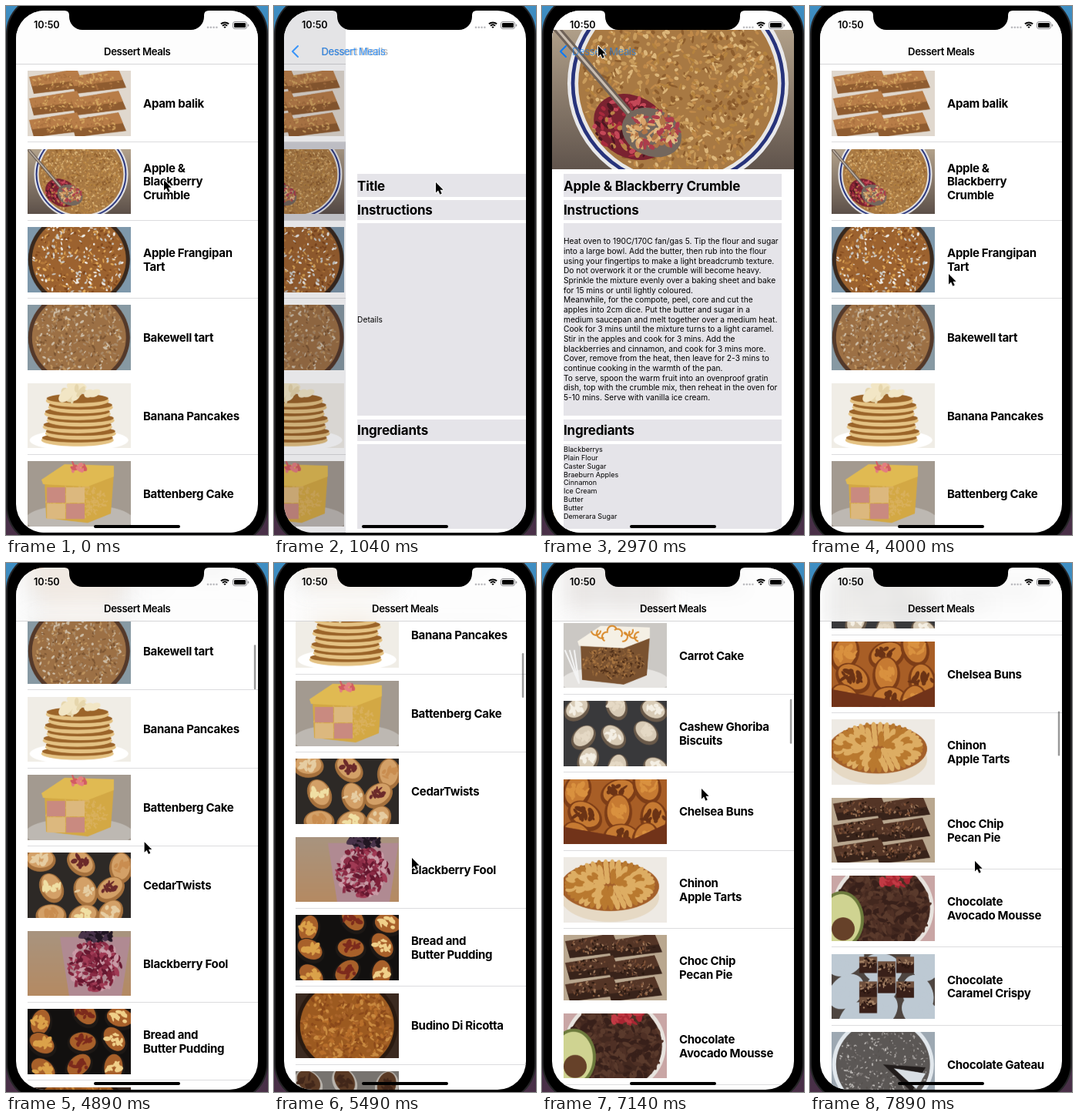
Animation, 340 px wide and 687 px high, one loop 8 s. Source, as an HTML page with a canvas:

```html
<!DOCTYPE html>
<html lang="en">
<head>
<meta charset="utf-8">
<title>Dessert Meals</title>
<style>
html, body { margin: 0; width: 100%; height: 100%; overflow: hidden; background: #000; }
canvas { display: block; }
</style>
</head>
<body>
<canvas id="stage" width="340" height="687"></canvas>
<script>
const stage = document.getElementById('stage').getContext('2d');
let g = stage;
const LOOP = 8000, TICK = 148.5, ROW = 101.4, TOP = 75.7;
const W = 133.5, H = 84.5, CX = W / 2, CY = H / 2, ZOOM = 314 / W;
const BLUE = '#007aff', PANEL = '#e5e4e9';

let seed = 1;
const random = () => (seed = seed * 16807 % 2147483647) / 2147483647;
const clamp = v => Math.max(0, Math.min(1, v));
const easeOut = u => 1 - (1 - clamp(u)) ** 3;
const smooth = u => u * u * (3 - 2 * u);
const mix = (a, b, u) => a + (b - a) * u;

// Drawing helpers
function box(color, x, y, w, h) { g.fillStyle = color; g.fillRect(x, y, w, h); }
function round(color, x, y, w, h, r) {
  g.fillStyle = color; g.beginPath(); g.roundRect(x, y, w, h, r); g.fill();
}
function oval(color, x, y, rx, ry = rx, turn = 0) {
  g.fillStyle = color; g.beginPath(); g.ellipse(x, y, rx, ry, turn, 0, 7); g.fill();
}
function trace(points) {
  g.beginPath();
  for (let i = 0; i < points.length; i += 2) g.lineTo(points[i], points[i + 1]);
}
function poly(color, ...points) { trace(points); g.fillStyle = color; g.fill(); }
function line(color, width, ...points) {
  trace(points); g.strokeStyle = color; g.lineWidth = width; g.lineCap = g.lineJoin = 'round'; g.stroke();
}
function arc(color, width, x, y, r, from, to) {
  g.beginPath(); g.arc(x, y, r, from, to);
  g.strokeStyle = color; g.lineWidth = width; g.lineCap = 'butt'; g.stroke();
}
function specks(colors, count, x, y, rx, ry, size) {
  for (let i = 0; i < count; i++) {
    const a = random() * 6.283, d = Math.sqrt(random());
    oval(colors[i % colors.length], x + rx * d * Math.cos(a), y + ry * d * Math.sin(a),
      size * (.5 + random()), size * (.3 + random() * .5), random() * 3);
  }
}
function text(string, x, y, weight, size, color = '#000', spacing = 0) {
  g.font = `${weight} ${size}px Inter, sans-serif`;
  g.letterSpacing = spacing + 'px';
  g.fillStyle = color;
  g.fillText(string, x, y);
}

// Kinds of dish, each drawn from a few colours
function backdrop(top, bottom = top) {
  const fade = g.createLinearGradient(0, 0, 0, H);
  fade.addColorStop(0, top); fade.addColorStop(1, bottom);
  box(fade, 0, -5, W, H + 10);
}
function pie(back, rim, base, crumbs, size = 2) {
  backdrop(back);
  oval(rim, CX, CY, 66, 62);
  oval(base, CX, CY, 61, 57);
  specks(crumbs, 420, CX, CY, 59, 54, size);
}
function crumble() {
  backdrop('#b3a28b', '#5c5049');
  for (const [i, color] of ['#e9e9eb', '#27337b', '#e8e7e6', '#a87943'].entries()) {
    oval(color, 69.5, 33, 61 - i * 2, 59 - i * 2);
  }
  specks(['#c99c5c', '#8d5d2d', '#dcb67a', '#b5833f', '#c08a4a'], 1100, 69.5, 33, 53, 51, 1.4);
  oval('#7a2230', 44, 57, 22, 17, .5);
  specks(['#a82a3d', '#4c1720', '#c44858', '#b98347'], 120, 44, 57, 21, 16, 1.8);
  line('#6f6258', 4, 2, 2, 44, 51);
  line('#c9bdb0', 1.4, 2, 2, 44, 51);
  oval('#74675d', 55, 60, 17, 13, .4);
  specks(['#d9a36a', '#ad3d4b', '#e0bd85', '#b27646'], 130, 56, 59, 14, 10, 1.8);
}
function stack(back, plate, side, top, topping) {
  backdrop(back);
  oval(plate, CX, 74, 64, 14);
  for (let i = 0; i < 7; i++) {
    const x = CX + (i % 2) * 4 - 2, y = 74 - i * 8.5;
    oval(side, x, y, 47 - i, 8);
    oval(top, x, y - 3, 46 - i, 6);
  }
  specks(topping, 12, CX, 12, 28, 8, 9);
}
function block(back, plate, top, front, crumbs) {
  backdrop(back);
  oval(plate, CX, 76, 70, 20);
  poly(front, 22, 24, 78, 30, 112, 16, 108, 68, 78, 80, 24, 74);
  specks(crumbs, 260, 64, 52, 40, 21, 1.8);
  poly(top, 18, 24, 48, 4, 112, 6, 112, 20, 78, 33, 20, 30);
}
function heap(back, shade, face, fillings, size = 20) {
  backdrop(back);
  for (let i = 0; i < 9; i++) {
    const x = (i % 3 + .35) * 45 + random() * 16, y = (i / 3 | 0) * 34 + 4 + random() * 14, turn = random() * 3;
    oval(shade, x, y + 2, size, size * .75, turn);
    oval(face, x, y, size * .85, size * .6, turn);
    specks([fillings[i % fillings.length]], 12, x, y, size * .55, size * .35, size * .2);
  }
}
function slices(back, shade, face, crumbs) {
  backdrop(back);
  for (let i = 0; i < 6; i++) {
    const x = 30 + i % 2 * 54, y = 4 + (i / 2 | 0) * 28;
    poly(shade, x - 28, y + 4, x + 34, y - 6, x + 44, y + 18, x - 22, y + 26);
    poly(face, x - 28, y + 4, x + 34, y - 6, x + 40, y + 8, x - 24, y + 16);
    specks(crumbs, 60, x + 6, y + 10, 28, 10, 1.8);
  }
}
function glass(back, table, cream, colors) {
  backdrop(back, table);
  poly(cream, 42, 8, W, 8, 122, H, 54, H);
  specks(colors, 260, 87, 46, 34, 32, 4);
  specks(['#211622', '#49334a'], 70, 90, 6, 20, 8, 4);
}

const meals = [
  [['Apam balik'], () => slices('#e0d8ce', '#8f5c30', '#b87d48', ['#d3a45f', '#a9713f'])],
  [['Apple &', 'Blackberry', 'Crumble'], crumble],
  [['Apple Frangipan', 'Tart'], () => pie('#7e98ab', '#39291e', '#9c622f', ['#dfa858', '#81481e', '#f0eee9', '#b5793a', '#c9c8c3'])],
  [['Bakewell tart'], () => pie('#8799a3', '#54392a', '#9c7045', ['#cdbda6', '#a98a69', '#7d5633', '#bd935f'])],
  [['Banana Pancakes'], () => stack('#f0ede6', '#fff', '#e4c283', '#9b6429', ['#f2e6c5', '#e6d6ac'])],
  [['Battenberg Cake'], () => {
    block('#a39a90', '#bdb8b2', '#e0ba52', '#d3a844', ['#d9b05c']);
    for (let i = 0; i < 4; i++) box(i % 3 ? '#dcb87e' : '#c98a80', 25 + i % 2 * 25, 34 + (i >> 1) * 21, 24, 20);
    specks(['#d25c62', '#e47d80'], 12, CX, 8, 12, 5, 4);
  }],
  [['CedarTwists'], () => heap('#2d2926', '#a5703c', '#d3a067', ['#e6cda2', '#6b2a2a', '#c98d50', '#f0dfa4'])],
  [['Blackberry Fool'], () => glass('#a8947f', '#b58a62', '#b08a92', ['#7c2038', '#65172f', '#a03a54', '#8a2b45', '#c99aa6'])],
  [['Bread and', 'Butter Pudding'], () => heap('#12100f', '#1d1815', '#a8602a', ['#dba24a', '#7c2a1c', '#f0d08a'])],
  [['Budino Di Ricotta'], () => pie('#3b2a20', '#2a1a10', '#9c5a20', ['#b86f2b', '#8b491a', '#a9642a', '#c98a40'], 3)],
  [['Canadian', 'Butter Tarts'], () => heap('#77736f', '#b9b4ad', '#5a3a25', ['#42271a'])],
  [['Carrot Cake'], () => {
    block('#cbc8c4', '#e6e4e1', '#f5f0e5', '#7a5230', ['#a87541', '#513019', '#8f6237']);
    for (let i = 0; i < 9; i++) arc('#d98a2b', 2, 42 + i * 7, 10 + i % 3 * 4, 6, i, i + 3);
    for (let i = 0; i < 3; i++) line('#f4f4f4', 2, 2 + i * 6, 36, 20, 78);
  }],
  [['Cashew Ghoriba', 'Biscuits'], () => heap('#39393b', '#6a5a4a', '#d8cbb6', ['#f4efe4', '#e5d9c5'], 18)],
  [['Chelsea Buns'], () => {
    heap('#a85e26', '#7d3d17', '#c67a32', ['#d9913f', '#6b3315'], 24);
    poly('#713319', 0, 62, 90, 78, W, 58, W, H, 0, H);
  }],
  [['Chinon', 'Apple Tarts'], () => {
    backdrop('#eeeae4');
    oval('#e6d9c4', 60, 52, 64, 32);
    oval('#a4602a', 60, 38, 64, 32);
    for (let r = 52; r > 4; r -= 12) for (let a = 0; a < 6.28; a += 8 / r) {
      oval(random() < .4 ? '#b9792f' : '#ddad63', 60 + r * Math.cos(a), 36 + r * .5 * Math.sin(a), 7, 3.5, a);
    }
  }],
  [['Choc Chip', 'Pecan Pie'], () => slices('#b9a78f', '#38231a', '#543526', ['#805338', '#29180f', '#a07a5c', '#614031'])],
  [['Chocolate', 'Avocado Mousse'], () => {
    pie('#c9a6a5', '#e8e4df', '#43281f', ['#4f3025', '#38201a', '#5a3a2c'], 5);
    specks(['#a92632', '#c23a44'], 30, 84, 4, 24, 8, 5);
    oval('#6c7a3c', 13, 57, 29, 37); oval('#cfd391', 13, 57, 25, 33); oval('#664129', 15, 69, 15);
  }],
  [['Chocolate', 'Caramel Crispy'], () => {
    heap('#4e4540', '#bdc9d3', '#bdc9d3', ['#bdc9d3'], 26);
    for (let i = 0; i < 7; i++) {
      const x = 36 + i % 3 * 24, y = 4 + (i / 3 | 0) * 26 + i % 2 * 6;
      box('#392019', x, y, 23, 21);
      box('#70503d', x, y, 23, 8);
      specks(['#a78467', '#29150f'], 22, x + 11, y + 8, 10, 7, 1.8);
    }
  }],
  [['Chocolate Gateau'], () => {
    pie('#9da8b2', '#e2e8ed', '#5b5755', ['#a8a4a1', '#55504d', '#c4c1be', '#7b7674'], 1.4);
    poly('#211c1b', CX, CY, 122, 46, 104, 78);
    poly('#d9dfe4', CX + 14, CY + 5, 122, 54, 110, 74);
  }],
];

const photos = meals.map(([, paint], i) => {
  const canvas = document.createElement('canvas');
  canvas.width = 314;
  canvas.height = Math.round(H * ZOOM);
  g = canvas.getContext('2d');
  g.scale(ZOOM, ZOOM);
  seed = 77 + i * 991;
  paint();
  return canvas;
});
g = stage;
g.imageSmoothingQuality = 'high';

const instructions = `Heat oven to 190C/170C fan/gas 5. Tip the flour and sugar
into a large bowl. Add the butter, then rub into the flour
using your fingertips to make a light breadcrumb texture.
Do not overwork it or the crumble will become heavy.
Sprinkle the mixture evenly over a baking sheet and bake
for 15 mins or until lightly coloured.
Meanwhile, for the compote, peel, core and cut the
apples into 2cm dice. Put the butter and sugar in a
medium saucepan and melt together over a medium heat.
Cook for 3 mins until the mixture turns to a light caramel.
Stir in the apples and cook for 3 mins. Add the
blackberries and cinnamon, and cook for 3 mins more.
Cover, remove from the heat, then leave for 2-3 mins to
continue cooking in the warmth of the pan.
To serve, spoon the warm fruit into an ovenproof gratin
dish, top with the crumble mix, then reheat in the oven for
5-10 mins. Serve with vanilla ice cream.`.split('\n');
const ingredients = ['Blackberrys', 'Plain Flour', 'Caster Sugar', 'Braeburn Apples', 'Cinnamon',
  'Ice Cream', 'Butter', 'Butter', 'Demerara Sugar'];

// Each move: start time, end time, then the values reached
function follow(t, values, moves, ease) {
  for (const [start, end, ...goal] of moves) {
    const u = ease(clamp((t - start) / (end - start)));
    values = values.map((v, i) => mix(v, goal[i], u));
  }
  return values;
}
const pointerMoves = [[0, 594, 210, 229], [2150, 2950, 73, 52], [3250, 4000, 180, 348],
  [4440, 5490, 179, 383], [5940, 7128, 207, 293], [7128, 7870, 214, 387]];
const scrollMoves = [[4440, 5790, 442.8], [5940, 7128, 1121.8], [7128, 7870, 1300.4]];

function drawRows(scroll, highlight) {
  meals.forEach(([lines], i) => {
    const y = TOP + i * ROW - scroll;
    if (y < -ROW || y > 687) return;
    if (i == 1 && highlight > 0) box(`rgba(209,209,214,${highlight})`, 13, y, 314, ROW);
    g.drawImage(photos[i], 28, y + 8.5, W, H);
    lines.forEach((s, n) =>
      text(s, 178, y + 56.3 + (n - (lines.length - 1) / 2) * 17.8, 700, 15, '#000', -.3));
    // Hairlines vanish at some subpixel positions
    const part = y - Math.floor(y);
    if (i && (part < .2 || part > .4)) box('#dcdcde', 28, Math.floor(y - .2), 299, 1);
  });
}

function drawList(scroll, highlight) {
  box('#fff', 13, 0, 314, 687);
  drawRows(scroll, highlight);
  g.save();
  g.beginPath(); g.rect(13, 0, 314, 75); g.clip();
  box('#fdfdfd', 13, 0, 314, 75);
  if (scroll) {
    g.globalAlpha = .14;
    g.filter = 'blur(14px)';
    drawRows(scroll, 0);
  }
  g.restore();
  box('#d6d6d8', 13, 75, 314, 1);
  if (scroll) round('rgba(0,0,0,.4)', 321.8, 78.6 + scroll * .0876, 2.5, 58, 1.25);
}

function drawDetail(t) {
  const loaded = t > 1330;
  const heading = (s, y) => text(s, 28, y, 700, 17, '#000', -.2);
  box('#fff', 13, 0, 314, 687);
  if (t > 1480) g.drawImage(photos[1], 0, 8, 314, 181, 13, 31, 314, 181);
  const width = loaded ? 283 : 299;
  for (const [y, h] of [[218, 30], [252, 26], [282, 250], [537, 28], [569, 110]]) box(PANEL, 28, y, width, h);
  heading(loaded ? 'Apple & Blackberry Crumble' : 'Title', 239.5);
  heading('Instructions', 271);
  heading('Ingrediants', 557);
  if (!loaded) return text('Details', 28, 410.5, 400, 10.2);
  instructions.forEach((s, i) => text(s, 28, 309.3 + i * 12.67, 400, 10.2));
  ingredients.forEach((s, i) => text(s, 28, 579 + i * 10.85, 400, 9));
}

function drawNavText(push, pressed) {
  const x = mix(127, 39, push);
  g.globalAlpha = 1 - push;
  text('Dessert Meals', x, 63.5, 600, 13.2, '#000', -.38);
  g.globalAlpha = push * (pressed ? .6 : 1);
  text('Dessert Meals', x, 63.5, 400, 13, BLUE, -.38);
  g.globalAlpha = push;
  line(BLUE, 2, 31, 52, 24, 59, 31, 66);
  g.globalAlpha = 1;
}

function drawBody() {
  const desk = g.createLinearGradient(0, 0, 0, 687);
  desk.addColorStop(0, '#3f8fc4'); desk.addColorStop(.5, '#16283c'); desk.addColorStop(1, '#4a3048');
  box(desk, 0, 0, 340, 687);
  round('#252527', 0, -14, 340, 714, 50);
  round('#000', 2, -12, 336, 710, 48);
}

function drawStatus() {
  g.fillStyle = '#000';
  g.beginPath();
  g.moveTo(76, 0); g.lineTo(76, 6); g.quadraticCurveTo(82, 6, 82, 12);
  g.arcTo(82, 31, 100, 31, 17); g.arcTo(257, 31, 257, 12, 17); g.lineTo(257, 12);
  g.quadraticCurveTo(257, 6, 263, 6); g.lineTo(263, 0); g.fill();
  text('10:50', 36, 29, 600, 12.6);
  for (let i = 0; i < 4; i++) oval('#b9b9bd', 262 + i * 3.8, 27.7, 1.3);
  for (let i = 0; i < 3; i++) arc('#000', 2, 284, 29, 1.4 + i * 3.1, -2.3, -.84);
  g.strokeStyle = '#8c8c90'; g.lineWidth = 1;
  g.beginPath(); g.roundRect(294.5, 20.5, 18, 9, 2.5); g.stroke();
  round('#000', 296, 22, 15, 6, 1.2);
  round('#8c8c90', 313.8, 23.4, 1.4, 3.2, .7);
  round('#000', 114, 674, 112, 4, 2);
}

function drawPointer(x, y) {
  g.save();
  g.translate(x, y);
  g.scale(.9, .9);
  const arrow = [0, 0, 0, 15, 3.4, 11.8, 6, 17.4, 8.6, 16.2, 6.1, 10.8, 10.7, 10.8];
  line('#fff', 2, ...arrow, 0, 0);
  poly('#000', ...arrow);
  g.restore();
}

function draw(t) {
  const push = easeOut((t - 880) / 436) - easeOut((t - 3190) / 436);
  const highlight = t > 880 ? 1 - clamp((t - 3200) / 600) : 0;
  const [scroll] = follow(t, [0], scrollMoves, easeOut);
  drawBody();
  g.save();
  g.beginPath(); g.roundRect(13, 6, 314, 678, 37); g.clip();
  g.save();
  g.translate(-94.2 * push, 0);
  drawList(scroll, highlight);
  g.restore();
  if (push > 0) {
    box(`rgba(0,0,20,${.13 * push})`, 13, 0, 314, 687);
    g.save();
    g.translate(314 * (1 - push), 0);
    drawDetail(t);
    g.restore();
  }
  drawNavText(push, t > 2950);
  drawStatus();
  g.restore();
  drawPointer(...follow(t, [205, 226], pointerMoves, smooth));
}

function frame() {
  const t = performance.now() % LOOP;
  draw(Math.floor((t + 15) / TICK) * TICK);
  requestAnimationFrame(frame);
}
frame();
</script>
</body>
</html>
```
